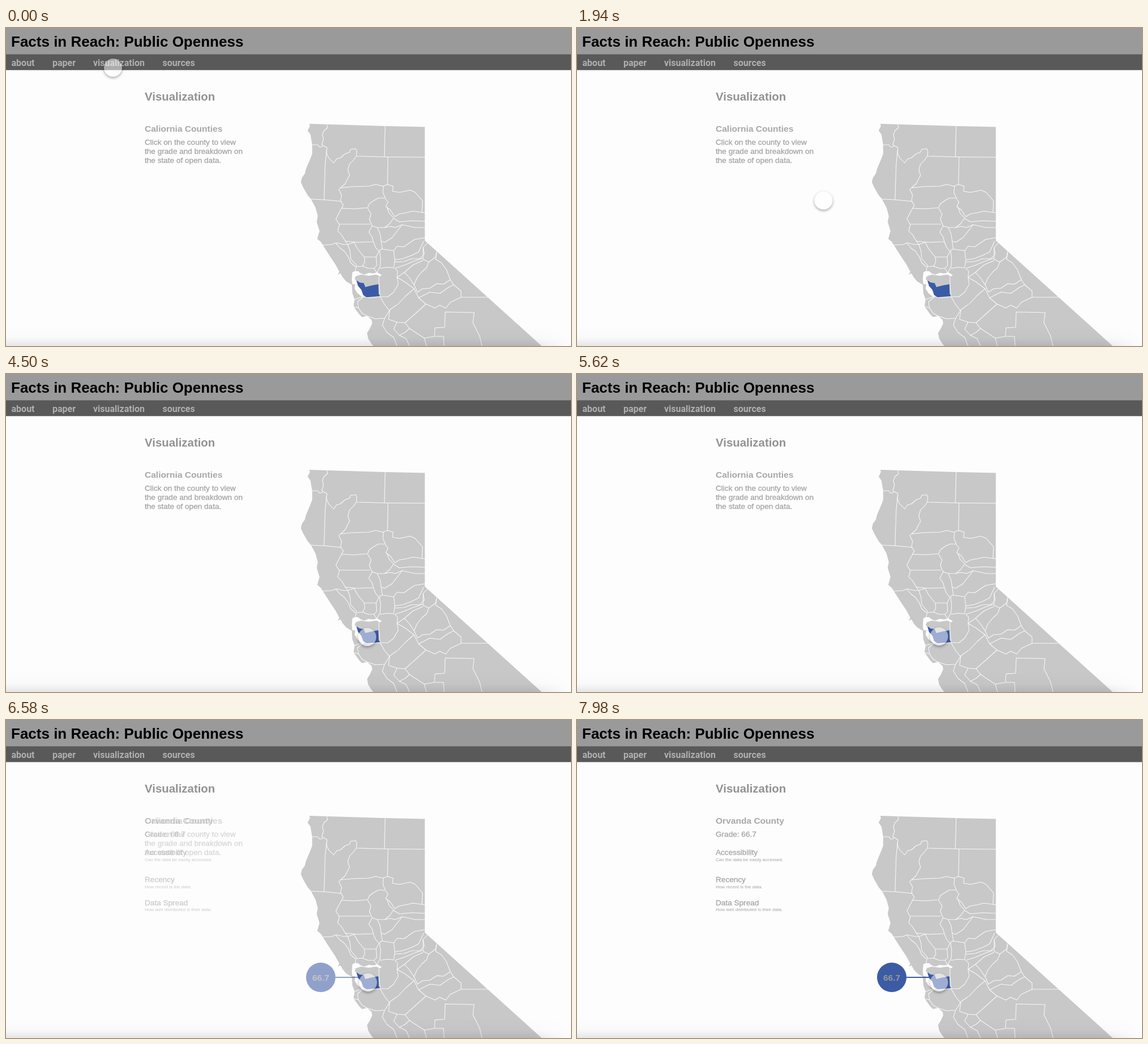
Recreate the animation shown at these times as an HTML page. Size 998 by 561 pixels, loop 8000 ms.

```html
<!DOCTYPE html>
<html lang="en">
<head>
<meta charset="utf-8">
<title>County map</title>
<style>
  html, body { margin: 0; width: 100%; height: 100%; overflow: hidden; background: #fdfdfd; }
  svg { position: absolute; left: 0; top: 0; width: 998px; height: 561px; }
  text { font-family: "Liberation Sans", Arial, sans-serif; fill: #a3a3a3; }
  .title { font-size: 26px; font-weight: bold; fill: #000; }
  .nav text { font: bold 16px Roboto, sans-serif; fill: #b0b0b0; }
  .heading { font-size: 20.4px; font-weight: bold; fill: #929292; }
  .sub { font-size: 15.55px; font-weight: bold; fill: #a8a8a8; }
  .body { font-size: 13.6px; stroke: #a3a3a3; stroke-width: .3px; }
  .note { font-size: 8.1px; }
  .score { font-size: 15.4px; font-weight: bold; fill: #989898; text-anchor: middle; }
  .land { fill: #c8c8c8; }
  .borders { fill: none; stroke: #f8f8f8; stroke-width: 1.05; stroke-linejoin: round; }
  .blue { fill: #3c5ba5; }
  .link { stroke: #3c5ba5; stroke-width: 2; }

  .intro { animation: fade-out 8s linear infinite; }
  .detail { animation: fade-in 8s linear infinite; }
  @keyframes fade-out { 0%, 75% { opacity: 1; } 87.8%, 100% { opacity: 0; } }
  @keyframes fade-in { 0%, 75% { opacity: 0; } 87.8%, 100% { opacity: 1; } }

  .pointer {
    position: absolute; left: -16px; top: -16px; width: 32px; height: 32px;
    border-radius: 50%; background: rgba(255, 255, 255, .5);
    box-shadow: 0 2px 5px rgba(0, 0, 0, .36);
    animation: travel 8s infinite;
  }
  @keyframes travel {
    0% { transform: translate(189px, 70px); }
    11% { transform: translate(189px, 70px); animation-timing-function: ease-in; }
    24.25% { transform: translate(435px, 304px); animation-timing-function: ease-out; }
    37% { transform: translate(631px, 461px); }
    39% { transform: translate(631px, 461px); animation-timing-function: ease-in-out; }
    54% { transform: translate(638px, 464px); animation-timing-function: ease-in-out; }
    70%, 100% { transform: translate(639.5px, 463px); }
  }
</style>
</head>
<body>
<svg viewBox="0 0 998 561">
  <defs>
    <linearGradient id="shade" x2="0" y2="1">
      <stop offset="0" stop-opacity="0"/>
      <stop offset=".6" stop-opacity=".015"/>
      <stop offset="1" stop-opacity=".09"/>
    </linearGradient>
    <linearGradient id="fade">
      <stop offset=".93" stop-color="#fff"/>
      <stop offset="1" stop-color="#fff" stop-opacity="0"/>
    </linearGradient>
    <mask id="right-fade"><rect y="525" width="998" height="36" fill="url(#fade)"/></mask>
  </defs>

  <rect width="998" height="74.3" fill="#595959"/>
  <rect width="998" height="46.4" fill="#9a9a9a"/>
  <text class="title" x="9" y="33">Facts in Reach: Public Openness</text>
  <g class="nav">
    <text x="9.5" y="67">about</text>
    <text x="82" y="67">paper</text>
    <text x="154" y="67">visualization</text>
    <text x="276.5" y="67">sources</text>
  </g>
  <text class="heading" x="245" y="127.5">Visualization</text>

  <g transform="translate(.8 0)">
    <!-- State outline: north and east edges, then the coast -->
    <path class="land" d="M535 169L669 173 739 174.5V375L945.5 561H648L644 556 639 548 637 538 642 530 646 521 645 515
      637 508 628 510 623 505 618 498 613 491 615 479 611 468 610 453 600 447 594 440 590 433 585 435 588 430
      581 417 571 402 562 388 555 377 549 372 553 358 548 342 550 332 546 317 538 302 532 295 524 281 520 272
      522 264 527 257 529 249 537 230 540 222 540 206 537 188 532 181 536 173Z"/>
    <!-- Bay -->
    <path fill="#fdfdfd" d="M611 431L610 443 611 452 616 452 615 460 620 468 628 474 633 473 629 462 622 455 619 446
      615 443 617 438 626 435 640 437 653 435 660 438 663 436 655 431 648 433 640 432 632 435 626 433 621 429 615 429Z"/>

    <g class="borders">
      <!-- North -->
      <path d="M566 170L567 176 561 181 558 188 560 196 557 206 566 211 565 220 569 229 578 238 583 231 590 229
        598 222 606 219 608 214 617 213 619 218 618 226 673 227.5 739 228"/>
      <path d="M540 206L550 206 553 210 559 209M669 173L667.5 227M674 227L673 276"/>
      <path d="M566 212L563 240 561 303M538 302L562 303 592 306"/>
      <path d="M618 226L613 233 606 240 603 250 606 260 601 269 598 275 590 282 587 285 592 295 590 305 595 312 592 318"/>
      <path d="M590 282L610 280 640 279 652 276 665 279 673 276 683 279 682 288 694 290 704 288 713 286 722 290
        728 297 735 305 734 325"/>
      <path d="M666 279L665 290 670 302 674 307 670 315 678 321 686 333M592 318L615 319 638 317 641 310 648 305 657 300 668 300"/>
      <path d="M686 333L694 328 706 326 718 323 739 326M672 316L676 327 684 335 677 345 668 352 655 352 646 349 641 338 644 328 638 318"/>
      <path d="M684 336L694 342 716 340 739 341M668 352L678 350 687 352 699 347 722 352 739 352"/>

      <!-- Valley and north coast -->
      <path d="M592 318L587 327 582 337 588 347 585 358 592 365 598 375 603 382M587 346L642 346"/>
      <path d="M646 349L640 360 646 369 648 377 620 378 598 376M655 352L660 363 662 377 664 390 659 392"/>
      <path d="M662 376L668 378 681 370 688 361 699 347"/>
      <path d="M558 383L575 382 582 379 596 382 603 382 614 378 620 389 627 398 632 404 653 404 658 394 652 387 648 377"/>
      <path d="M582 380L589 388 597 394 604 404 608 414 616 421M603 382L607 394 608 407 618 418 616 430"/>
      <path d="M632 404L633 413 629 420 618 421M653 404L654 419 649 424 655 433M629 420L639 424 650 424"/>
      <path d="M659 392L661 407 660 421 654 432M664 390L684 393 690 385 702 386 712 379 721 373 739 370"/>
      <path d="M684 393L686 409 700 407 716 401 728 395 737 376M686 409L684 423 672 422 660 424"/>

      <!-- Foothills -->
      <path d="M686 413L702 412 716 407 730 407 738 399 736 387 744 379"/>
      <path d="M686 424L704 418 718 412 735 406M686 424L691 429 690 440 703 431 718 418 736 410"/>
      <path d="M736 387L736 408 746 413 758 404 760 394M746 413L742 423 734 430 725 441 720 453"/>
      <path d="M690 440L704 448 720 460 706 472 691 488M690 440L692 452 684 466 674 474 661 474"/>
      <path d="M703 431L712 441 720 453 726 466 735 460 748 459 760 451 772 452 784 444"/>
      <path d="M760 396L758 408 768 414 777 426 784 444 790 453 803 464 803 475 852 475"/>
      <path d="M720 460L728 476 741 487 721 505 704 520M728 476L748 466 766 468 780 458 790 453"/>
      <path d="M741 487L757 494 765 489 776 494 784 484 803 475"/>

      <!-- South and coast -->
      <path d="M658 438L658 452 660 474 668 488 676 498 690 488M661 474L640 476 629 474 615 479"/>
      <path d="M613 491L622 494 628 503 637 508M622 494L620 483 630 475M637 508L652 513 668 512 677 498"/>
      <path d="M677 498L675 514 690 519 704 520 712 530 724 538 738 547 742 561"/>
      <path d="M668 512L664 524 672 537 684 546 690 561M690 519L684 531 694 542 706 548 712 561"/>
      <path d="M712 530L704 537 694 542M738 547L756 544 757 529 774 528 775 501 826 502 824 520 836 544 840 561"/>
      <path d="M757 544L772 544 773 561"/>
    </g>

    <path class="blue" d="M618 445L624 449 631 450 634 457 646 454 657 452 657.5 469 660 473 648 474 636 475
      630 471 627 462 621 455Z"/>
  </g>

  <g class="intro">
    <text class="sub" x="245" y="183">Caliornia Counties</text>
    <text class="body" x="245" y="206">Click on the county to view</text>
    <text class="body" x="245" y="222">the grade and breakdown on</text>
    <text class="body" x="245" y="237.5">the state of open data.</text>
  </g>

  <g class="detail">
    <text class="sub" x="245" y="183">Orvanda County</text>
    <text class="body" x="245" y="206">Grade: 66.7</text>
    <text class="body" x="245" y="237.5">Accessibility</text>
    <text class="note" x="245" y="248.5">Can the data be easily accessed.</text>
    <text class="body" x="245" y="285.5">Recency</text>
    <text class="note" x="245" y="296.5">How recent is the data.</text>
    <text class="body" x="245" y="326.5">Data Spread</text>
    <text class="note" x="245" y="337">How well distributed is their data.</text>
    <path class="link" d="M582 454H628"/>
    <circle class="blue" cx="556" cy="454" r="26"/>
    <text class="score" x="556" y="459.5">66.7</text>
  </g>

  <rect y="525" width="998" height="36" fill="url(#shade)" mask="url(#right-fade)"/>
</svg>
<div class="pointer"></div>
</body>
</html>
```
